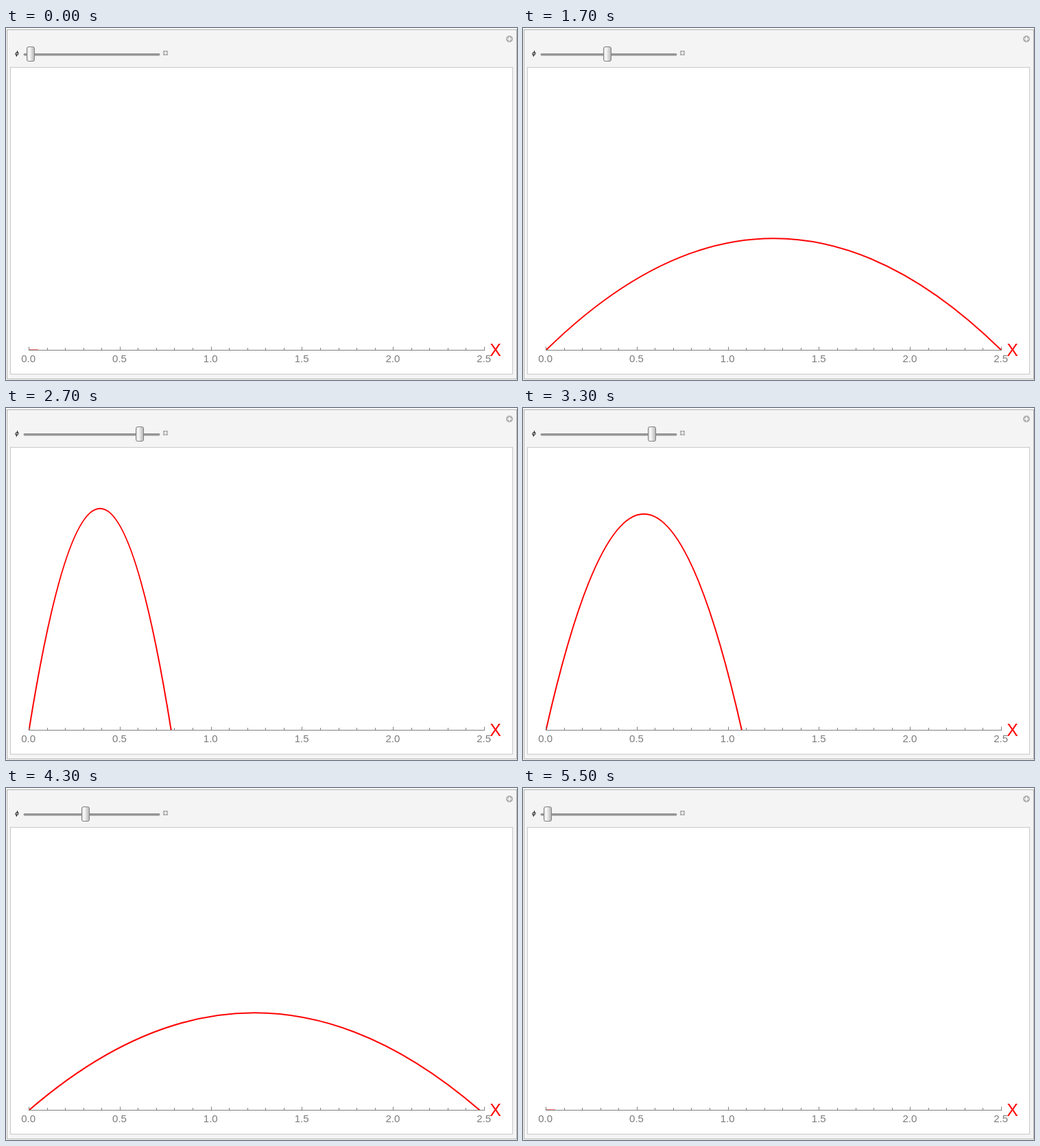
An HTML page for the animation above (6000 ms loop, 745 by 514 pixels).

```html
<!DOCTYPE html>
<html lang="en">
<head>
<meta charset="utf-8">
<title>Range of a projectile</title>
<style>
  html, body { margin: 0; width: 100%; height: 100%; overflow: hidden; background: #fff; }
  svg { display: block; width: 745px; height: 514px; }
  .tick { font: 15px "Liberation Sans", Arial, sans-serif; fill: #7b7b7b; text-anchor: middle; }
  .name { font: 25px "Liberation Sans", Arial, sans-serif; fill: #f00; text-anchor: middle; }
  .phi { font: italic 9px "DejaVu Sans", sans-serif; text-anchor: middle; }
</style>
</head>
<body>
<svg viewBox="0 0 745 514">
  <defs>
    <linearGradient id="metal">
      <stop offset="0" stop-color="#d2d2d2"/>
      <stop offset=".3" stop-color="#fbfbfb"/>
      <stop offset="1" stop-color="#b4b4b4"/>
    </linearGradient>
    <clipPath id="plot"><rect x="7" y="58" width="731" height="412.5"/></clipPath>
  </defs>

  <rect x="1.5" y="2.5" width="743" height="510" fill="#f4f4f4" stroke="#b0b0b0"/>
  <rect x="6.5" y="57.5" width="732" height="448" fill="#fff" stroke="#c8c8c8"/>

  <circle cx="734" cy="16" r="5" fill="#b2b2b2"/>
  <path d="M731 16h6M734 13v6" stroke="#fff" stroke-width="1.5"/>
  <rect x="229" y="33" width="7" height="7" rx=".5" fill="#b2b2b2"/>
  <path d="M230 36.5h5M232.5 34v5" stroke="#fff"/>

  <text class="phi" x="16" y="40">ϕ</text>
  <rect x="25.5" y="37" width="199" height="3.4" rx="1.7" fill="#959595"/>
  <rect id="thumb" x="30.5" y="27.5" width="11" height="21" rx="2.5" fill="url(#metal)" stroke="#808080"/>

  <path id="arc" clip-path="url(#plot)" fill="none" stroke="#f00" stroke-width="2"/>
  <path id="axis" fill="none" stroke="#808080"/>
  <g id="labels"></g>
  <text class="name" x="713.7" y="479">X</text>
</svg>
<script>
  const X0 = 33.5, Y0 = 470.5, UNIT = 265.6;
  const REACH = 2.5, PHI_MIN = 0.01, PHI_MAX = Math.PI / 2;
  const STEP = 100, STEPS = 60, REST = 1 / 12;
  const $ = id => document.getElementById(id);

  function drawAxis() {
    let d = `M${X0 - 0.5} ${Y0}H698`, text = "";
    for (let n = 0; n <= 25; n++) {
      const x = X0 + n * UNIT / 10, major = n % 5 === 0;
      d += `M${Math.floor(x) + 0.5} ${Y0}v${major ? -5 : -3.5}`;
      if (major) text += `<text class="tick" x="${x - 0.8}" y="488">${(n / 10).toFixed(1)}</text>`;
    }
    $("axis").setAttribute("d", d);
    $("labels").innerHTML = text;
  }

  // Rest, linear rise to the middle of the loop, then the same back
  function angle(step) {
    const u = step / (STEPS - 1);
    const rise = Math.max(0, (Math.min(u, 1 - u) - REST) / (0.5 - REST));
    return PHI_MIN + (PHI_MAX - PHI_MIN) * rise;
  }

  let shown = -1;
  function draw(now) {
    const step = Math.floor(now / STEP) % STEPS;
    if (step !== shown) {
      shown = step;
      const phi = angle(step);
      const range = REACH * UNIT * Math.sin(2 * phi);
      const height = REACH / 2 * UNIT * Math.sin(phi) ** 2;
      $("arc").setAttribute("d", `M${X0} ${Y0}q${range / 2} ${-2 * height} ${range} 0`);
      $("thumb").setAttribute("x", 30.5 + Math.round((phi - PHI_MIN) * 113.4));
    }
  }

  drawAxis();
  const start = performance.now();
  function loop() {
    draw(performance.now() - start);
    requestAnimationFrame(loop);
  }
  loop();
</script>
</body>
</html>
```
